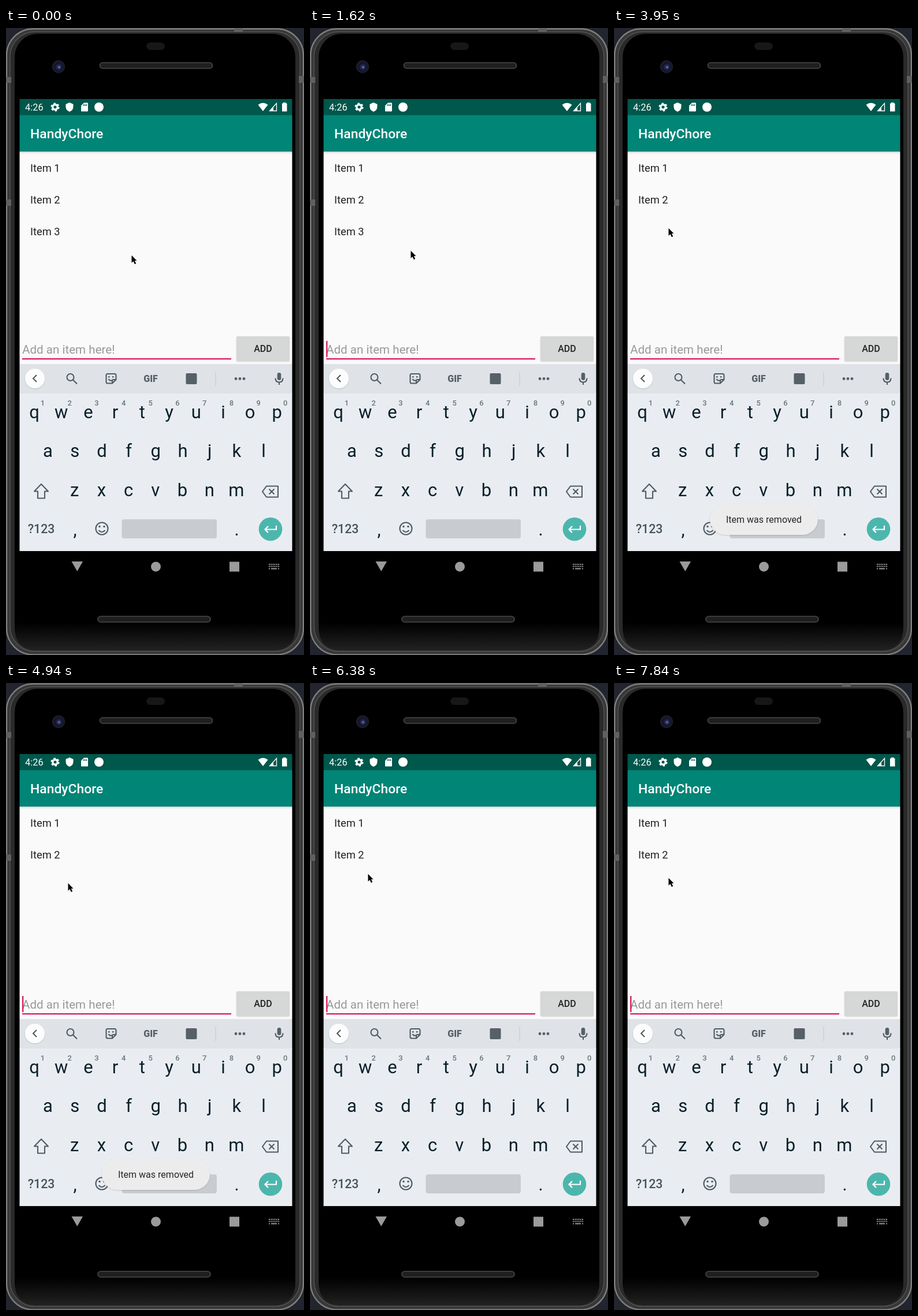
Recreate the animation shown at these times as an HTML page. Size 516 by 1086 pixels, loop 7.99 s.

```html
<!DOCTYPE html>
<html lang="en">
<head>
<meta charset="utf-8">
<title>Todo list on a phone</title>
<style>
html, body { margin: 0; width: 100%; height: 100%; overflow: hidden; background: #22252d; }
svg { display: block; width: 516px; height: 1086px; font-family: Roboto, sans-serif; }
.mid { text-anchor: middle; }
.medium { font-weight: 500; }
.item { font-size: 18.33px; fill: #212121; }
.key { font-size: 31px; fill: #0a1f29; }
.digit { font-size: 13px; font-weight: 500; fill: #6c757a; }
.line { fill: none; stroke: #4f5b62; stroke-width: 2.1; }
.icon { fill: #566067; }
.nav { fill: #9b9b9b; }

#pointer, #caret, #third, #toast { animation: 7990ms step-end infinite; }
#pointer { animation-name: move; }
#caret { animation-name: blink; }
#third { animation-name: remove; }
#toast { animation-name: toast; }

@keyframes move {
  0% { transform: translate(217px, 393px); }
  2.12% { transform: translate(212px, 387px); }
  3.87% { transform: translate(203px, 381px); }
  5.63% { transform: translate(194px, 387px); }
  9.26% { transform: translate(190px, 387px); }
  10.88% { transform: translate(186px, 387px); }
  12.64% { transform: translate(183px, 388px); }
  16.52% { transform: translate(180px, 387px); }
  18.39% { transform: translate(177px, 386px); }
  20.27% { transform: translate(174px, 385px); }
  22.02% { transform: translate(140px, 368px); }
  23.77% { transform: translate(105px, 351px); }
  25.65% { transform: translate(94px, 346px); }
  56.82% { transform: translate(102px, 350px); }
  58.32% { transform: translate(109px, 352px); }
  61.82% { transform: translate(107px, 346px); }
  63.7% { transform: translate(104px, 338px); }
  65.58% { transform: translate(101px, 333px); }
  67.33%, 79.84% { transform: translate(100px, 330px); }
  81.47% { transform: translate(98px, 338px); }
  83.22% { transform: translate(96px, 345px); }
  86.73% { transform: translate(100px, 355px); }
  88.36% { transform: translate(115px, 400px); }
  89.98% { transform: translate(135px, 440px); }
  91.61% { transform: translate(144px, 465px); }
  93.24% { transform: translate(130px, 440px); }
  94.86% { transform: translate(110px, 395px); }
  96.49% { transform: translate(97px, 352px); }
  98.12%, 100% { transform: translate(94px, 337px); }
}
@keyframes blink {
  0%, 12.64%, 25.65%, 38.42%, 49.43%, 63.7%, 74.46%, 86.73% { opacity: 0; }
  5.63%, 18.39%, 31.28%, 44.05%, 56.82%, 69.08%, 79.84%, 93.24%, 100% { opacity: 1; }
}
@keyframes remove {
  0% { opacity: 1; }
  44.05%, 100% { opacity: 0; }
}
@keyframes toast {
  0% { opacity: 0; }
  44.05% { opacity: .15; }
  45.93% { opacity: .45; }
  47.68% { opacity: .75; }
  49.43% { opacity: 1; }
  67.33% { opacity: .85; }
  69.08% { opacity: .55; }
  70.96%, 100% { opacity: 0; }
}
</style>
</head>
<body>
<svg viewBox="0 0 516 1086">
  <defs>
    <linearGradient id="base" x2="0" y2="1">
      <stop offset="0" stop-color="#000"/>
      <stop offset="1" stop-color="#222"/>
    </linearGradient>
    <radialGradient id="lens" fx=".55" fy=".55">
      <stop offset="0" stop-color="#8a90b8"/>
      <stop offset=".22" stop-color="#2b3160"/>
      <stop offset=".6" stop-color="#10132a"/>
      <stop offset="1" stop-color="#20222c"/>
    </radialGradient>
    <linearGradient id="fade" x2="0" y2="1">
      <stop offset="0" stop-color="#000" stop-opacity=".16"/>
      <stop offset="1" stop-color="#000" stop-opacity="0"/>
    </linearGradient>
    <filter id="soft" x="-20%" y="-30%" width="140%" height="170%">
      <feDropShadow dx="0" dy="1" stdDeviation="1.2" flood-opacity=".16"/>
    </filter>
  </defs>

  <!-- phone body -->
  <rect width="516" height="1086" fill="#22252d"/>
  <rect x="1" y="1.5" width="514" height="1084" rx="46" fill="#383838" stroke="#808080" stroke-width="2.4"/>
  <rect x="7" y="6.5" width="502" height="1073" rx="43" fill="#2a2a2a" stroke="#545454" stroke-width="1.4"/>
  <rect x="15" y="10" width="486" height="1068" rx="40"/>
  <path d="M15 1030H501V1038Q501 1078 461 1078H55Q15 1078 15 1038Z" fill="url(#base)"/>
  <path d="M0 85H9V95H0ZM0 297H9V308H0ZM507 83H516V95H507ZM395 1H410V7H395Z" fill="#606060"/>
  <rect x="243" y="25" width="32" height="13" rx="6.5" fill="#171717"/>
  <circle cx="91" cy="67" r="11" fill="url(#lens)"/>
  <g fill="#1f1f1f" stroke="#484848" stroke-width="1.6">
    <rect x="162.5" y="60" width="195" height="10" rx="5"/>
    <rect x="159" y="1019" width="195" height="10" rx="5"/>
  </g>

  <!-- app -->
  <path d="M23.500 214H495.500V582H23.500Z" fill="#fafafa"/>
  <path d="M23.500 214H495.500V218H23.500Z" fill="url(#fade)"/>
  <path d="M23.500 151H495.500V214H23.500Z" fill="#008577"/>
  <path d="M23.500 123H495.500V151H23.500Z" fill="#00574b"/>
  <g fill="#fff">
    <text x="33" y="143" font-size="16.4">4:26</text>
    <circle cx="85" cy="137" r="4.2" fill="none" stroke="#fff" stroke-width="3.4"/>
    <circle cx="85" cy="137" r="6.4" fill="none" stroke="#fff" stroke-width="2.4" stroke-dasharray="3.35"/>
    <path d="M110 129L116.5 132V136.5Q116.5 142.5 110 145Q103.5 142.5 103.5 136.5V132Z"/>
    <path d="M135 129.5H141Q142 129.5 142 130.5V143.5Q142 144.5 141 144.5H131Q130 144.5 130 143.5V134.5Z"/>
    <path d="M134.5 132v3M137 132v3M139.5 132v3" stroke="#00574b" stroke-width="1.3"/>
    <circle cx="161" cy="137" r="8"/>
    <path d="M436.5 133Q445 126.5 453.5 133L445 144Z"/>
    <path d="M468.5 130.5V143.5H456.5Z" fill="none" stroke="#fff" stroke-width="1.3"/>
    <path d="M463 136.5V144H456Z"/>
    <path d="M480 130.5V129H484.5V130.5H486.5V144.5H478V130.5Z"/>
    <text x="42" y="191" font-size="22.9" class="medium">HandyChore</text>
  </g>
  <text x="42" y="249" class="item">Item 1</text>
  <text x="42" y="304" class="item">Item 2</text>
  <text x="42" y="359" class="item" id="third">Item 3</text>

  <text x="28" y="564" font-size="20.6" fill="#999">Add an item here!</text>
  <path d="M28 572H390V574.3H28Z" fill="#d81b60"/>
  <rect id="caret" x="28" y="542" width="2.3" height="28" fill="#d81b60"/>
  <rect x="399" y="534" width="92" height="43" rx="2" fill="#d6d7d7" filter="url(#soft)"/>
  <text x="445" y="561" font-size="16" fill="#212121" class="mid medium">ADD</text>

  <!-- keyboard -->
  <path d="M23.5 582H495.5V634H23.5Z" fill="#dfe3e7"/>
  <path d="M23.5 633H495.5V906H23.5Z" fill="#e9edf1"/>
  <circle cx="50" cy="607" r="17" fill="#fcfcfc" filter="url(#soft)"/>
  <path d="M53 601L47 607L53 613" class="line"/>
  <circle cx="111.5" cy="605" r="6" class="line"/>
  <path d="M116 609.5L123 616.5" class="line"/>
  <path d="M176 599H188Q190.5 599 190.5 601.5V609L184 615.5H176Q173.5 615.5 173.5 613V601.5Q173.5 599 176 599ZM190 609H186Q184 609 184 611V615M177.5 608Q180 612 183 610" class="line"/>
  <path d="M177 603h2.5v2.5h-2.5zM184 603h2.5v2.5h-2.5z" class="icon"/>
  <text x="250.5" y="613" font-size="16" font-weight="800" class="mid icon">GIF</text>
  <rect x="311.5" y="598" width="19" height="19" rx="2" class="icon"/>
  <path d="M363 595V620" stroke="#c3c9cd"/>
  <g class="icon">
    <circle cx="398" cy="607.5" r="2.4"/>
    <circle cx="405" cy="607.5" r="2.4"/>
    <circle cx="412" cy="607.5" r="2.4"/>
    <rect x="469.7" y="597" width="6.6" height="13" rx="3.3"/>
  </g>
  <path d="M466.5 606.5Q466.5 613.5 473 613.5T479.5 606.5M473 613.5V618" class="line"/>

  <g id="keys"></g>

  <path d="M61 790L73 802.5H67V814.5H55V802.5H49Z" class="line" stroke-linejoin="round"/>
  <path d="M451 793.5H471V812.5H451L444 803ZM455.5 798.5L464.5 807.5M464.5 798.5L455.5 807.5" class="line" stroke-linejoin="round"/>
  <text x="61" y="875" font-size="21.3" fill="#46545b" class="mid medium">?123</text>
  <text x="119.5" y="879" class="key mid">,</text>
  <text x="399.5" y="879" class="key mid">.</text>
  <circle cx="166" cy="867" r="10.5" class="line"/>
  <path d="M160.5 870Q166 876 171.5 870" class="line"/>
  <circle cx="162" cy="863.5" r="1.8" class="icon"/>
  <circle cx="170" cy="863.5" r="1.8" class="icon"/>
  <rect x="200.5" y="851" width="164.5" height="33" rx="4" fill="#c8ccd0"/>
  <circle cx="458" cy="868" r="20.3" fill="#4db6ac"/>
  <path d="M468 862V868.5H449M454 863L448.5 868.5L454 874" fill="none" stroke="#fff" stroke-width="2.2"/>

  <g id="toast">
    <rect x="166" y="824" width="187" height="54" rx="27" fill="#ececed" filter="url(#soft)"/>
    <text x="259.5" y="857" font-size="16.04" fill="#252525" class="mid">Item was removed</text>
  </g>

  <!-- navigation bar -->
  <g class="nav">
    <path d="M113.5 924H133L123.3 941Z"/>
    <circle cx="259.5" cy="933" r="8.5"/>
    <rect x="387" y="924.5" width="17" height="17"/>
  </g>
  <path d="M455 929H473M455 932.5H473" stroke="#9b9b9b" stroke-width="2" stroke-dasharray="2 1.2"/>
  <path d="M455 936.5H457M459 936.5H469M471 936.5H473" stroke="#9b9b9b" stroke-width="2"/>

  <path id="pointer" d="M.5 .8V13.800L3.500 11L5.800 16L8.200 15L5.900 10H9.500Z" stroke="#fafafa" stroke-width="1.6" paint-order="stroke"/>
</svg>
<script>
const keys = document.getElementById("keys");
const pitch = 46.7;

function label(text, x, y, type) {
  const el = document.createElementNS("http://www.w3.org/2000/svg", "text");
  el.setAttribute("x", x);
  el.setAttribute("y", y);
  el.setAttribute("class", type + " mid");
  el.textContent = text;
  keys.append(el);
}

function row(text, x, y, type = "key") {
  [...text].forEach((c, i) => label(c, x + i * pitch, y, type));
}

row("qwertyuiop", 49, 676);
row("1234567890", 63.5, 654, "digit");
row("asdfghjkl", 72.5, 743);
row("zxcvbnm", 118.7, 811);
</script>
</body>
</html>
```
